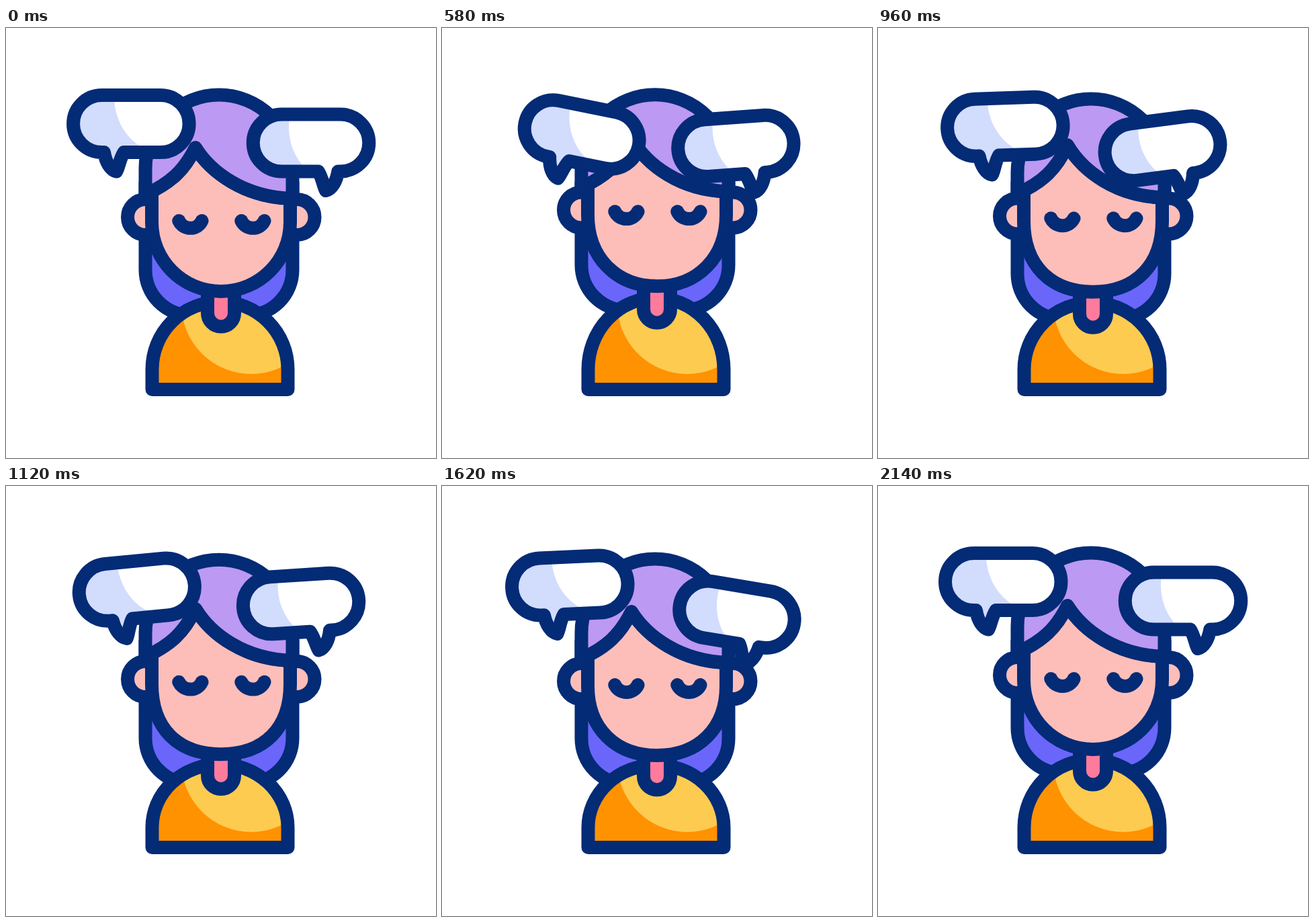
These frames come from a looping animation (640 by 640 pixels, 2.4 s). An HTML page:

```html
<!DOCTYPE html>
<html lang="en">
<head>
<meta charset="utf-8">
<title>Inner thoughts</title>
<style>
  html, body { margin: 0; width: 100%; height: 100%; overflow: hidden; background: #fff; }
  svg { display: block; width: 100%; height: 100%; }
  .ink { stroke: #042b76; stroke-width: 20; stroke-linecap: round; stroke-linejoin: round; }
</style>
</head>
<body>
<svg viewBox="0 0 640 640">
  <defs>
    <clipPath id="shirtClip"><path id="shirtClipPath"/></clipPath>
    <clipPath id="bubbleClip"><use href="#bubbleShape"/></clipPath>
    <path id="bubbleShape" d="M-43.75-42.5H43.75A42.5 42.5 0 0 1 43.75 42.5H-10.75C-17 52-18 64-22 71C-31 69-38 57-40.25 42.5H-43.75A42.5 42.5 0 0 1-43.75-42.5Z"/>
  </defs>

  <path id="backHair" class="ink" fill="#6a66fa"/>

  <path id="shirtFill" fill="#ff9200"/>
  <circle cx="365" cy="411" r="104" fill="#fdcb50" clip-path="url(#shirtClip)"/>
  <path id="shirtLine" class="ink" fill="none"/>

  <path id="neck" class="ink" fill="#ff7b9c" d="M300 385V424.5A20 20 0 0 0 340 424.5V385"/>

  <g id="ears" class="ink" fill="#fdbeb9">
    <circle cx="207.5" cy="281.5" r="26.5"/>
    <circle cx="433" cy="281.5" r="26.5"/>
  </g>
  <path id="face" class="ink" fill="#fdbeb9"/>
  <path id="frontHair" class="ink" fill="#bc99f2"/>
  <path id="eyes" class="ink" fill="none"
    d="M257.3 287C264 301.5 285 301.5 291.5 287M350.3 287C357 301.5 378 301.5 384.5 287"/>

  <g id="leftBubble">
    <use href="#bubbleShape" fill="#fff"/>
    <path fill="#d2dcfd" clip-path="url(#bubbleClip)" d="M-25-33C-23-5-8 20 13 33V80H-100V-60H-25Z"/>
    <use href="#bubbleShape" class="ink" fill="none"/>
  </g>
  <g id="rightBubble">
    <g transform="scale(-1 1)">
      <use href="#bubbleShape" fill="#fff"/>
      <path fill="#d2dcfd" clip-path="url(#bubbleClip)" d="M32.5-33C35-8 28 15 13 33V80H100V-60H32.5Z"/>
      <use href="#bubbleShape" class="ink" fill="none"/>
    </g>
  </g>
</svg>

<script>
const LOOP = 2400;
const HEAD_TIMES = [0, 713, 1320, 2060];
const LEFT_TIMES = [0, 435, 870, 1305, 1740];
const RIGHT_TIMES = [410, 842, 1275, 1707, 2140];

const el = id => document.getElementById(id);
const set = (id, name, value) => el(id).setAttribute(name, value);

// Linear keyframe interpolation, clamped at both ends.
function track(t, times, values) {
  if (t <= times[0]) return values[0];
  const i = times.findIndex(time => time > t);
  if (i < 0) return values[values.length - 1];
  const p = (t - times[i - 1]) / (times[i] - times[i - 1]);
  return values[i - 1] + (values[i] - values[i - 1]) * p;
}

function drawHead(t) {
  const nod = (up, down) => track(t, HEAD_TIMES, [0, up, down, 0]);
  const eyes = nod(-16.9, 15.3);
  const ears = nod(-13, 15.3);
  const chin = nod(-9.4, 15.3);
  const neck = nod(-7, 13);
  const top = 209 + nod(-0.3, 15.3);
  const hairEnd = 360 + nod(-9, 27);
  const roundness = 0.5523 + nod(0.048, 0.088);

  set("eyes", "transform", `translate(0 ${eyes})`);
  set("ears", "transform", `translate(0 ${ears})`);
  set("neck", "transform", `translate(0 ${neck})`);

  set("backHair", "d", `M207.5 230V${hairEnd}A67.5 67.5 0 0 0 275 ${hairEnd + 67.5}
    H359A67.5 67.5 0 0 0 426.5 ${hairEnd}V230Z`);

  const cheek = 289 + ears, jaw = 392 + chin;
  const kx = 103 * roundness, ky = cheek + (jaw - cheek) * roundness;
  set("face", "d", `M217 ${240 + ears}V${cheek}C217 ${ky} ${320 - kx} ${jaw} 320 ${jaw}
    C${320 + kx} ${jaw} 423 ${ky} 423 ${cheek}V${254 + ears}
    C355 ${252 + ears} 305 ${215 + ears} 282 ${178 + eyes}
    C265 ${212 + ears} 245 ${230 + ears} 217 ${240 + ears}Z`);

  set("frontHair", "d", `M207.5 ${248 + ears}V${top}A109.5 109.5 0 0 1 426.5 ${top}V${254 + ears}
    C355 ${252 + ears} 305 ${215 + ears} 282 ${178 + eyes}
    C265 ${212 + ears} 245 ${231 + ears} 207.5 ${248 + ears}Z`);

  const shirt = `M217.5 538V508A101 ${100.5 - neck} 0 0 1 419.5 508V538Z`;
  for (const id of ["shirtClipPath", "shirtFill", "shirtLine"]) set(id, "d", shirt);
}

function drawBubble(id, t, times, cx, cy, first, second) {
  const [x, y, turn] = [0, 1, 2].map(i => track(t, times, [0, first[i], 0, second[i], 0]));
  set(id, "transform", `translate(${cx + x} ${cy + y}) rotate(${turn})`);
}

function draw(t) {
  drawHead(t);
  drawBubble("leftBubble", t, LEFT_TIMES, 186.25, 142.5, [33, 24, 17.3], [14.8, 20.2, -9.5]);
  drawBubble("rightBubble", t, RIGHT_TIMES, 454, 171, [-42, 11.2, -10.3], [-18.8, 25.3, 11.8]);
}

const start = performance.now();
function tick() {
  draw((performance.now() - start) % LOOP);
  requestAnimationFrame(tick);
}
tick();
</script>
</body>
</html>
```
